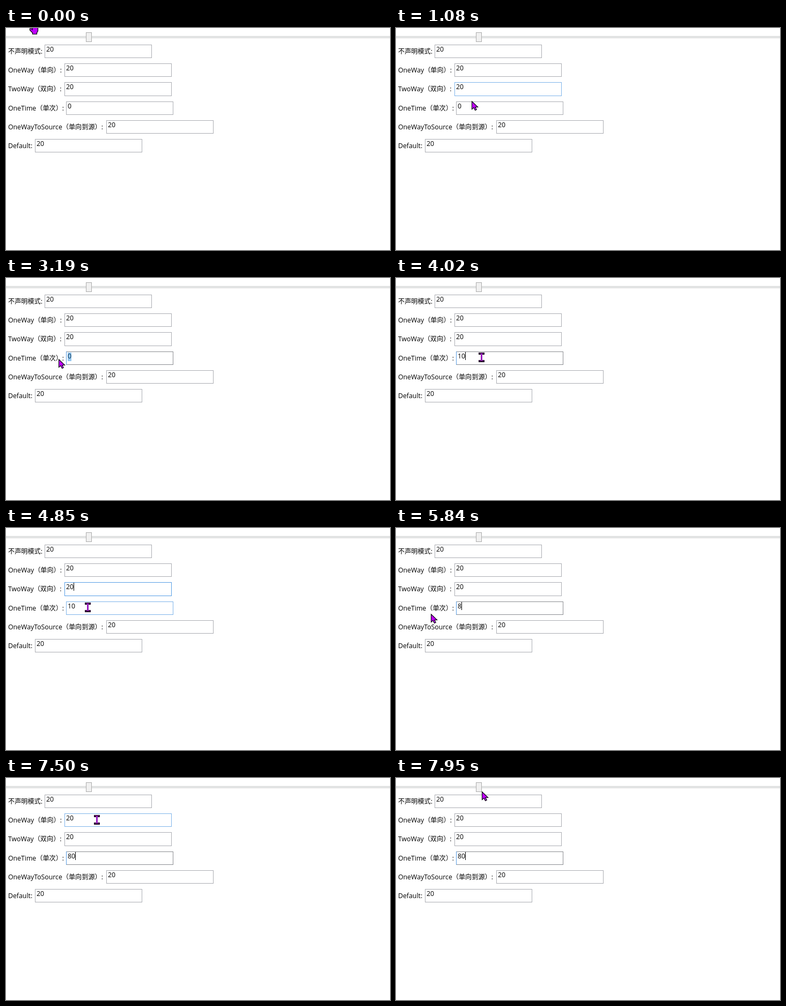
Animation, 716 px wide and 414 px high, one loop 8000 ms. Source, as an HTML page:

```html
<!DOCTYPE html>
<html lang="zh-CN">
<head>
<meta charset="utf-8">
<style>
  html, body { margin: 0; width: 100%; height: 100%; overflow: hidden; background: #fff; }
  svg { display: block; width: 716px; height: 414px; }
  text { font: 12.3px "Open Sans", "Noto Sans CJK SC", "Noto Sans CJK", sans-serif; white-space: pre; text-spacing-trim: space-all; }
  .cjk { font-size: 12.15px; }
</style>
</head>
<body>
<svg id="stage" viewBox="0 0 716 414" xmlns="http://www.w3.org/2000/svg"></svg>
<script>
const LOOP = 8000, TICK = 90;
const FIRST_TOP = 31, PITCH = 35.2, BOX_W = 200, BOX_H = 25.2, DIGIT = 7;
const CARET_ON = 530, CARET_PERIOD = 980;
const TWO_WAY = 2, ONE_TIME = 3;
const GRAY = '#abadb3', HOVER = '#7eb4ea', FOCUS = '#569de5', FOCUS_DIM = '#8a8c91';
const PURPLE = '#bf00ff';
const stage = document.getElementById('stage');

function add(parent, tag, attrs = {}, text) {
  const node = document.createElementNS(stage.namespaceURI, tag);
  set(node, attrs);
  if (text !== undefined) node.textContent = text;
  parent.append(node);
  return node;
}

function set(node, attrs) {
  for (const key in attrs) node.setAttribute(key, attrs[key]);
}

const show = (node, on) => set(node, { visibility: on ? 'visible' : 'hidden' });

// Slider
add(stage, 'rect', { x: -4.5, y: 15.5, width: 725, height: 3, fill: '#e7eaea', stroke: '#d6d6d6' });
add(stage, 'rect', { x: 149.5, y: 8.5, width: 10, height: 17, fill: '#f0f0f0', stroke: '#acacac' });

// Labelled text boxes: latin part, CJK part, left edge of the box
const rows = [
  ['', '不声明模式', 72],
  ['OneWay', '（单向）', 109],
  ['TwoWay', '（双向）', 109],
  ['OneTime', '（单次）', 112],
  ['OneWayToSource', '（单向到源）', 187],
  ['Default', '', 54]
].map(([latin, cjk, x], i) => {
  const top = FIRST_TOP + PITCH * i;
  const y = Math.round(top), h = Math.round(top + BOX_H) - y;
  const label = add(stage, 'text', { x: 4, y: y + 17 });
  add(label, 'tspan', {}, latin);
  add(label, 'tspan', { class: 'cjk' }, cjk);
  add(label, 'tspan', {}, ':');
  const frame = add(stage, 'rect', { x: x + .5, y: y + .5, width: BOX_W - 1, height: h - 1, fill: '#fff' });
  const value = add(stage, 'text', { x: x + 3, y: y + 13 }, '20');
  return { x, y, h, frame, value };
});

const { x: editX, y: editY, h: editH } = rows[ONE_TIME];
const leftEdge = add(stage, 'rect', { x: editX, y: editY, width: 1, height: editH, fill: FOCUS });
const selection = add(stage, 'rect', { x: editX + 3, y: editY + 2, height: 16, fill: '#0078d7', opacity: .4 });
const caret = add(stage, 'rect', { width: 1, height: 15 });

// Pointer shapes, hot spot at 0,0
const pointer = add(stage, 'g');
const shapes = { hand: add(pointer, 'g'), arrow: add(pointer, 'g'), beam: add(pointer, 'g') };
add(shapes.hand, 'path', {
  d: 'M-3 -8V3L-5 1H-7.5V4L-2.5 9V11.5H5.5V9L7.5 5.5V-8Z',
  fill: PURPLE, stroke: '#000', 'stroke-width': 1.2
});
add(shapes.arrow, 'path', {
  d: 'M.5 .8V15.6L4 12.4L6.6 17.5L9.2 16.3L6.9 11.5H11.6Z',
  fill: PURPLE, stroke: '#000', 'stroke-width': 1.1
});
add(shapes.beam, 'path', { d: 'M-5 -9H6V-5H2V5H6V9H-5V5H-1V-5H-5Z', fill: '#1c0620' });
add(shapes.beam, 'path', { d: 'M-4 -7.5H5M-4 6.5H5', stroke: '#7a1a92' });
add(shapes.beam, 'path', { d: 'M.5 -7V6', stroke: '#9a1cc0', 'stroke-width': 3 });

// Pointer moves: first step, last step, destination
const moves = [
  [90, 360, 140, 127],
  [630, 810, 144, 121],
  [1080, 1260, 138, 148],
  [2650, 3190, 98, 151],
  [3840, 4020, 159, 148],
  [4110, 4560, 157, 116],
  [4760, 4850, 152, 148],
  [5030, 5480, 65, 158],
  [5840, 5840, 65, 160],
  [5930, 6580, 190, 116],
  [6850, 6850, 198, 129],
  [6940, 7120, 184, 160],
  [7320, 7950, 160, 25]
];

// Every move becomes decelerating hops, one per tick
const hops = [{ at: 0, x: 52, y: 0 }];
for (const [from, to, x, y] of moves) {
  const origin = hops.at(-1);
  const count = Math.round((to - from) / TICK) + 1;
  for (let n = 1; n <= count; n++) {
    const p = 1 - (1 - n / count) ** 2;
    hops.push({
      at: count > 1 ? from + (to - from) * (n - 1) / (count - 1) : from,
      x: Math.round(origin.x + (x - origin.x) * p),
      y: Math.round(origin.y + (y - origin.y) * p)
    });
  }
}

// Clicks, drags and key presses; each restarts the caret
const edits = [
  { at: 0, text: '0' },
  { at: 1460, text: '0', row: ONE_TIME },
  { at: 2740, text: '0', row: ONE_TIME, selected: true },
  { at: 3840, text: '1', row: ONE_TIME },
  { at: 3930, text: '10', row: ONE_TIME },
  { at: 4560, text: '10', row: TWO_WAY },
  { at: 5030, text: '10', row: ONE_TIME },
  { at: 5210, text: '10', row: ONE_TIME, selected: true },
  { at: 5840, text: '8', row: ONE_TIME },
  { at: 5930, text: '80', row: ONE_TIME },
  { at: 6580, text: '80', row: TWO_WAY },
  { at: 7320, text: '80', row: ONE_TIME },
  { at: 7500, text: '80', row: ONE_TIME }
];

const indexAt = (list, t) => list.findLastIndex(item => item.at <= t);
const boxUnder = p => rows.findIndex(({ x, y, h }) =>
  p.x >= x && p.x < x + BOX_W && p.y >= y && p.y < y + h);

function borderColor(i, focus, hover) {
  if (i === focus) return i === ONE_TIME ? FOCUS_DIM : FOCUS;
  return i === hover ? HOVER : GRAY;
}

function draw(t) {
  const step = indexAt(hops, t);
  const hop = hops[step];
  const { at, text, row: focus, selected } = edits[indexAt(edits, t)];

  const inside = boxUnder(hop);
  // The hover border lingers for one hop
  const hover = inside >= 0 || step === 0 ? inside : boxUnder(hops[step - 1]);

  rows[ONE_TIME].value.textContent = text;
  rows.forEach(({ frame }, i) => set(frame, { stroke: borderColor(i, focus, hover) }));
  show(leftEdge, focus === ONE_TIME);

  show(selection, selected);
  set(selection, { width: text.length * DIGIT });

  const focused = rows[focus];
  show(caret, focused && !selected && (t - at) % CARET_PERIOD < CARET_ON);
  if (focused) {
    set(caret, { x: focused.x + 3 + focused.value.textContent.length * DIGIT, y: focused.y + 1 });
  }

  const shape = step === 0 ? 'hand' : inside >= 0 ? 'beam' : 'arrow';
  for (const name in shapes) show(shapes[name], name === shape);
  set(pointer, { transform: `translate(${hop.x} ${hop.y})` });
}

const start = performance.now();
function tick() {
  draw((performance.now() - start) % LOOP);
  requestAnimationFrame(tick);
}
tick();
</script>
</body>
</html>
```
